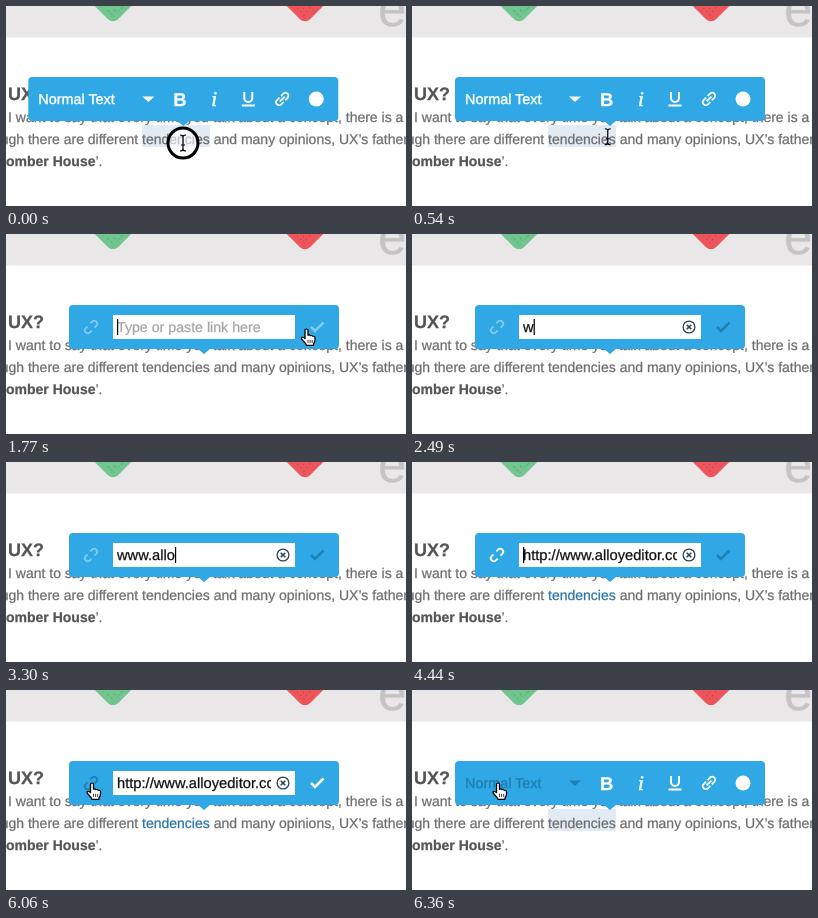
An HTML page for the animation above (7.36 s loop, 400 by 200 pixels).

```html
<!DOCTYPE html>
<html lang="en">
<head>
<meta charset="utf-8">
<title>Link toolbar</title>
<style>
  html, body { margin: 0; width: 100%; height: 100%; overflow: hidden; background: #fff; }
  svg { display: block; color: #6e6e6e; }
  text, tspan { fill: currentColor; stroke: currentColor; stroke-width: .25; }
  text { font: 14px "Liberation Sans", Arial, sans-serif; white-space: pre;
         text-rendering: geometricPrecision; }
  .strong { font-weight: bold; color: #555; }
  .panel { fill: #2fa8e5; }
  .item { color: #fff; }
  .item.hover { color: #1f80b3; }
  .item.disabled { opacity: .4; }
  .solid { fill: currentColor; }
  .line { fill: none; stroke: currentColor; stroke-width: 2; }
</style>
</head>
<body>
<svg width="400" height="200" viewBox="0 0 400 200">
  <rect width="400" height="31.5" fill="#e9e7e8"/>
  <g transform="translate(107 -11.5) rotate(45)">
    <rect x="-21" y="-21" width="42" height="42" rx="7" fill="#72c58f"/>
    <path d="M7 15H17M11 10H16M16 2V8" stroke="#5bb079" stroke-dasharray="3 1.5"/>
  </g>
  <g transform="translate(299 -11.5) rotate(45)">
    <rect x="-21" y="-21" width="42" height="42" rx="7" fill="#ec555b"/>
    <path d="M4 15H17M8 11H17M12 6H17" stroke="#c2434b" stroke-dasharray="1.5 3"/>
  </g>
  <text x="372" y="20" style="font-size:51px;color:#c5c3c4">e</text>

  <rect id="highlight" x="136" y="119" width="68" height="22" fill="#e2eaf4"/>
  <text class="strong" x="2" y="94" style="font-size:18px">UX?</text>
  <text x="2" y="116">I want to say that every time you talk about a concept, there is a</text>
  <text x="-24.8" y="138">though there are different <tspan id="word">tendencies</tspan> and many opinions, UX’s father</text>
  <text y="160"><tspan class="strong">omber House</tspan>’.</text>

  <g id="styles">
    <path class="panel" d="M47 71H349a4 4 0 0 1 4 4V111a4 4 0 0 1-4 4H204l-6 5-6-5H47a4 4 0 0 1-4-4V75a4 4 0 0 1 4-4z"/>
    <g class="item" data-from="43" data-to="178">
      <text x="53" y="98" style="font-size:14.4px;stroke-width:.4">Normal Text</text>
      <path class="solid" d="M157 90.5h12l-6 5.5z"/>
    </g>
    <g class="item" data-from="178" data-to="212">
      <text x="188" y="99.5" style="font-size:18.5px;font-weight:bold">B</text>
    </g>
    <g class="item" data-from="212" data-to="246">
      <text x="226" y="100" style="font:italic 21px 'Liberation Serif',serif;stroke-width:.5">i</text>
    </g>
    <g class="item" data-from="246" data-to="280">
      <path class="line" d="M259 86v6a4 4 0 0 0 8 0v-6M256.5 99.5h13"/>
    </g>
    <g class="item" data-from="280" data-to="314">
      <path class="line" style="stroke-width:1.7" transform="translate(297 93) rotate(-45)"
        d="M-1-3h-3.5a3 3 0 0 0 0 6H-1M1-3h3.5a3 3 0 0 1 0 6H1M-3.5 0h7"/>
    </g>
    <g class="item" data-from="314" data-to="353">
      <circle class="solid" cx="331" cy="93" r="7.5"/>
    </g>
  </g>

  <g id="linkForm">
    <path class="panel" d="M67 71H329a4 4 0 0 1 4 4V111a4 4 0 0 1-4 4H204l-6 5-6-5H67a4 4 0 0 1-4-4V75a4 4 0 0 1 4-4z"/>
    <g class="item" id="unlink" data-from="63" data-to="107">
      <path class="line" style="stroke-width:1.8" transform="translate(85 93) rotate(-45)"
        d="M-2-3h-2.5a3 3 0 0 0 0 6H-2M2-3h2.5a3 3 0 0 1 0 6H2"/>
    </g>
    <rect x="107" y="81" width="182" height="24" fill="#fff"/>
    <svg x="107" y="81" width="158" height="24">
      <text id="hint" x="4" y="17" style="font-size:14.2px;color:#a5a5a5">Type or paste link here</text>
      <text id="url" x="4" y="17" style="font-size:14.7px;color:#111"></text>
      <rect id="caret" y="4" width="1.2" height="16" fill="#000"/>
    </svg>
    <g id="clear" fill="none" stroke="#2b4456" stroke-width="1.3">
      <circle cx="277" cy="93" r="5.9"/>
      <path d="M274.7 90.7l4.6 4.6m0-4.6l-4.6 4.6" stroke-width="1.6"/>
    </g>
    <g class="item" id="confirm" data-from="290" data-to="333">
      <path class="line" style="stroke-width:2.5" d="M305 93l4 4l8.5-8.5"/>
    </g>
  </g>

  <g id="cursor">
    <circle id="ring" r="15" fill="#fff" fill-opacity=".6" stroke="#000" stroke-width="3"/>
    <path id="beam" d="M-3-8q3 0 3 2V6q0 2-3 2M3-8q-3 0-3 2V6q0 2 3 2M-2 2H2" fill="none" stroke="#000" stroke-width="1.2"/>
    <g id="hand" transform="scale(1 .9)" stroke="#000" stroke-linejoin="round">
      <path d="M-1.5 1q1.5-2 3 0v6q1.5-1 2.5.4q1.6-.6 2.3.7q2-.3 2.2 1.5v3q0 2-1.5 4v1.5h-7q-.5-2-3-4.5q-3-3.5-1.5-4.3q1.5-.6 3 1.5z" fill="#fff" stroke-width="1.3"/>
      <path d="M1.5 12v3.5M3.6 12v3.5M5.7 12v3.5" stroke-width=".8"/>
    </g>
  </g>
</svg>
<script>
const LOOP = 7360, SLIDE = 210;
const OPEN = 1440, FOCUS = 1660, TYPE = 2370, RESUME = 3330, ENTER = 4220, CLOSE = 6150;
const ADDRESS = 'www.alloyeditor.com';
// time, x, y of the pointer
const PATH = [[0, 177, 137], [390, 177, 137], [1020, 306.5, 94], [1500, 306.5, 94], [1740, 300.5, 95],
  [4620, 300.5, 95], [5010, 215, 171], [5370, 215, 171], [6030, 86, 93], [LOOP, 86, 93]];

const $ = id => document.getElementById(id);
const items = [...document.querySelectorAll('.item')];
const clamp = v => Math.min(1, Math.max(0, v));
const smooth = v => v * v * (3 - 2 * v);
const between = (t, a, b) => t >= a && t < b;
const show = (id, on) => $(id).setAttribute('visibility', on ? 'inherit' : 'hidden');
const move = (id, x, y = 0) => $(id).setAttribute('transform', `translate(${x} ${y})`);
const settle = (t, start, offset) => offset * (1 - clamp((t - start) / SLIDE)) ** 3;

function pointer(t) {
  const i = PATH.findIndex(p => p[0] > t);
  const [t0, x0, y0] = PATH[i - 1], [t1, x1, y1] = PATH[i];
  const k = smooth((t - t0) / (t1 - t0));
  return [x0 + (x1 - x0) * k, y0 + (y1 - y0) * k];
}

function typed(t) {
  if (t < TYPE) return '';
  if (t >= ENTER) return 'http://' + ADDRESS;
  const count = t < RESUME ? Math.min(8, 1 + Math.floor((t - TYPE) / 130))
                           : 9 + Math.floor((t - RESUME) / 75);
  return ADDRESS.slice(0, count);
}

function caretOn(t) {
  if (t < FOCUS) return false;
  if (between(t, TYPE, ENTER)) return true;
  return (t - (t < TYPE ? FOCUS : ENTER)) % 1000 < 500;
}

function draw(t) {
  const editing = between(t, OPEN, CLOSE);
  const linked = between(t, ENTER, CLOSE);
  const text = typed(t);
  const [x, y] = pointer(t);

  show('styles', !editing);
  show('linkForm', editing);
  show('highlight', !editing);
  move('styles', t < OPEN ? settle(t, 0, -21) : settle(t, CLOSE, 20));
  move('linkForm', settle(t, OPEN, -20));
  $('word').style.color = linked ? '#2a75a8' : '';

  $('url').textContent = text;
  show('hint', editing && !text);
  show('clear', editing && text);
  show('caret', editing && caretOn(t));
  $('caret').setAttribute('x', 4 + (text && !linked ? $('url').getComputedTextLength() : 0));

  $('unlink').classList.toggle('disabled', !linked);
  $('confirm').classList.toggle('disabled', !text);
  const inBar = between(y, 71, 115);
  for (const item of items) {
    const { from, to } = item.dataset;
    const over = inBar && between(x, +from, +to);
    item.classList.toggle('hover', over && !item.classList.contains('disabled'));
  }

  const visible = !between(t, TYPE, 4620);
  const beam = !inBar || editing && between(x, 107, 289);
  move('cursor', x, y);
  show('cursor', visible);
  show('beam', visible && beam);
  show('hand', visible && !beam);
  const pressed = between(t, 1170, OPEN) || between(t, 6090, CLOSE + 30);
  $('ring').setAttribute('opacity', pressed ? 1 : t < 150 ? 1 - t / 150 : 0);
}

function tick() {
  draw(performance.now() % LOOP);
  requestAnimationFrame(tick);
}
tick();
</script>
</body>
</html>
```
